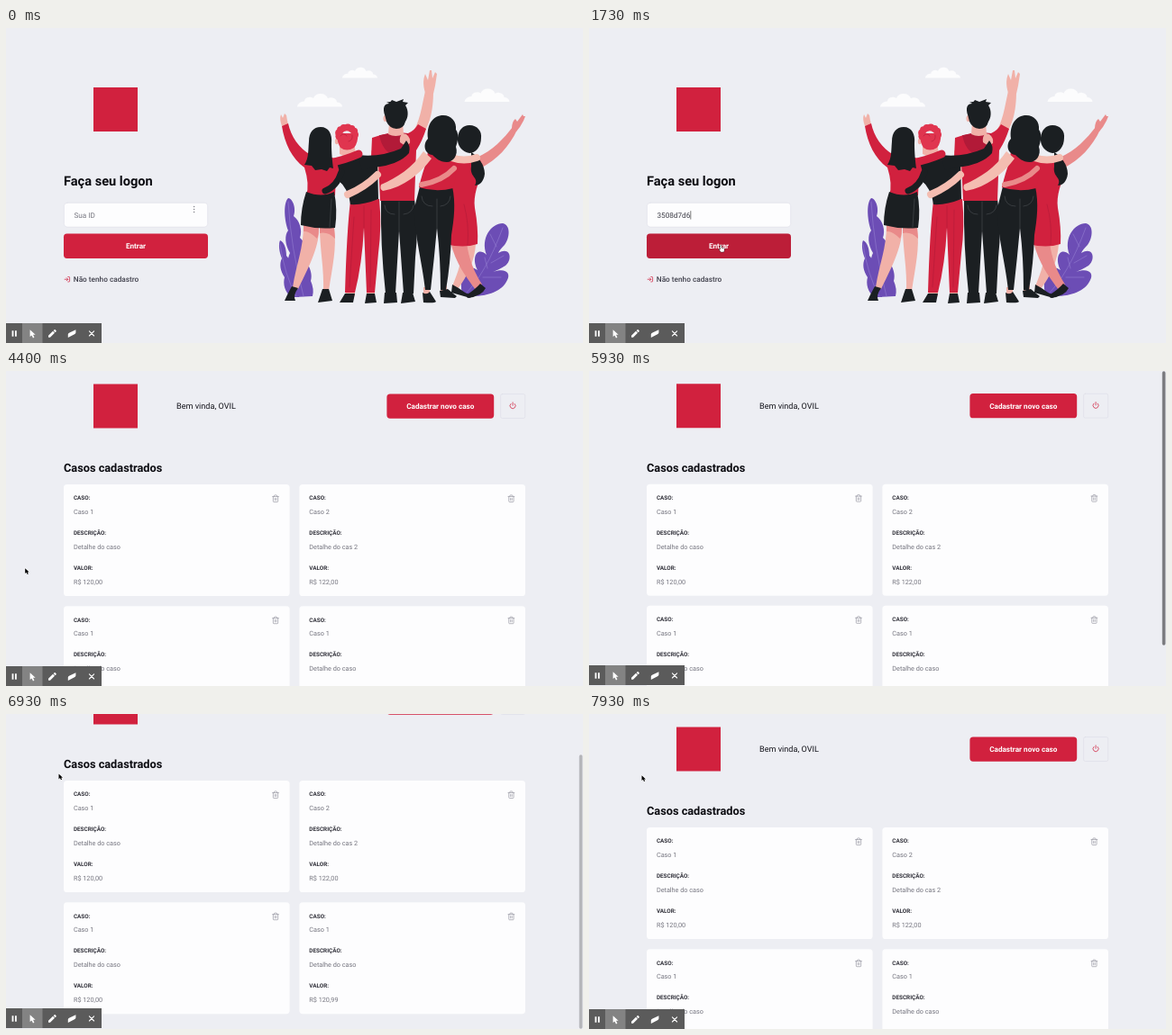
An HTML page with a canvas that plays this animation: 640 px wide and 350 px high, repeating every 8 s.

```html
<!DOCTYPE html>
<html lang="pt-BR">
<head>
<meta charset="utf-8">
<title>Logon e casos</title>
<style>
html, body { margin: 0; width: 100%; height: 100%; overflow: hidden; background: #edeef3; }
canvas { display: block; width: 640px; height: 350px; }
</style>
</head>
<body>
<canvas id="stage" width="640" height="350"></canvas>
<script>
const ctx = document.getElementById('stage').getContext('2d');
const LOOP = 8000;
const BG = '#edeef3', RED = '#d1213e', DARK = '#b21a38', BLACK = '#1b1f22';
const SKIN = '#f1b1a8', PALE = '#f4bdb1', ROSE = '#e98a8a', PURPLE = '#6c4db5', RIB = '#8f77cd';
const LABEL = '#2f2f38', GREY = '#75757f';

const clamp = v => Math.max(0, Math.min(1, v));
const span = (t, a, b) => clamp((t - a) / (b - a));
const easeOut = p => 1 - (1 - p) ** 3;
const easeInOut = p => p * p * (3 - 2 * p);

function fill(color, d) {
  ctx.fillStyle = color;
  ctx.fill(new Path2D(d));
}

function line(color, width, d) {
  ctx.strokeStyle = color;
  ctx.lineWidth = width;
  ctx.lineCap = ctx.lineJoin = 'round';
  ctx.stroke(new Path2D(d));
}

function oval(color, x, y, rx, ry = rx) {
  ctx.fillStyle = color;
  ctx.beginPath();
  ctx.ellipse(x, y, rx, ry, 0, 0, Math.PI * 2);
  ctx.fill();
}

function box(x, y, w, h, r, color, border) {
  ctx.beginPath();
  ctx.roundRect(x, y, w, h, r);
  if (color) { ctx.fillStyle = color; ctx.fill(); }
  if (border) { ctx.strokeStyle = border; ctx.lineWidth = 0.6; ctx.stroke(); }
}

// y is the middle of the capital letters
function text(s, x, y, size, color, weight = 400, align = 'left') {
  ctx.font = `${weight} ${size}px Roboto, sans-serif`;
  ctx.textAlign = align;
  ctx.fillStyle = color;
  ctx.fillText(s, x, y + size * 0.356);
}

function at(x, y, scale, draw) {
  ctx.save();
  ctx.translate(x, y);
  ctx.scale(scale, scale);
  draw();
  ctx.restore();
}

function cloud(x, y, w, h) {
  at(x, y, 1, () => {
    ctx.scale(w, h);
    fill('#fcfcfd', 'M0 0A.15 .4 0 0 1 .16 -.38A.12 .3 0 0 1 .36 -.62A.17 .5 0 0 1 .68 -.6A.13 .35 0 0 1 .88 -.32A.12 .32 0 0 1 1 0Z');
  });
}

function plants() {
  fill(PURPLE, 'M313 189C319 190 322 202 319 209C326 214 329 225 326 233C333 239 334 250 331 258C338 265 340 275 338 281Q342 290 340 298L320 299C315 290 314 282 317 276C311 266 312 256 315 250C309 240 309 230 313 225C309 215 307 195 313 189Z');
  fill(PURPLE, 'M304 236C309 238 311 246 311 253C316 258 317 266 317 271C324 278 327 290 325 299L317 299C309 294 307 284 309 277C304 270 303 262 306 256C303 249 302 240 304 236Z');
  line(RIB, 0.7, 'M313 193Q316 245 330 298M304 240Q309 275 322 298');
  fill(PURPLE, 'M507 297C503 288 505 276 510 270Q515 263 523 269C516 256 522 242 533 252C526 234 538 217 551 217C560 219 559 233 553 241Q547 247 546 250C560 242 562 258 554 264Q546 269 540 271C555 266 560 273 556 280C549 296 525 300 507 297Z');
  line(RIB, 0.7, 'M508 297Q532 274 551 222M534 267L531 255M538 261L552 253M524 281L517 272M529 277L549 277M544 243L537 229');
}

function womanInDress() {
  fill(SKIN, 'M506 240L521 240C520 258 512 276 501 290L495 287C502 270 506 258 506 240Z');
  fill(ROSE, 'M493 238L511 238C513 257 520 272 528 285L521 291C510 276 499 262 493 238Z');
  fill(BLACK, 'M510 297Q520 291 526 284L532 289Q528 298 512 300Z');
  fill(BLACK, 'M495 285L502 289Q508 294 516 297L515 300L494 294Z');
  fill(ROSE, 'M522 144C540 136 552 123 562 110L567 113C558 132 545 146 526 156Z');
  fill(ROSE, 'M561 112Q561 104 565 101L567 104L573 96L574 98L576 98L574 103L570 110L566 115Z');
  fill(RED, 'M494 150Q508 142 526 147L529 156C524 173 518 185 520 200Q524 222 523 240Q507 245 488 240L490 190Z');
  line(DARK, 0.6, 'M508 196Q514 218 512 241');
  fill(BLACK, 'M514 108C523 108 528 115 527 122C527 132 521 139 514 139C506 138 500 130 501 122C502 113 507 108 514 108Z');
  fill(BLACK, 'M516 138C524 143 531 152 531 162C530 171 525 175 520 175C525 166 514 166 516 154Z');
}

function womanInTop() {
  fill(SKIN, 'M463 288h7v9h-7zM482 286h7v8h-7z');
  fill(BLACK, 'M459 176Q476 182 495 176C499 195 497 212 494 230Q493 262 488 291L482 291Q482 255 478 222Q475 255 471 291L465 291C462 262 452 225 453 200Z');
  fill(BLACK, 'M462 294Q467 297 470 293L477 304Q476 306 463 305ZM481 292L490 290Q497 296 500 298L498 300L482 299Z');
  line('#54585d', 0.5, 'M478 190V222M461 187Q462 198 473 198M482 198Q492 197 493 187');
  fill(RED, 'M468 137Q484 130 498 142Q501 160 496 178Q477 183 458 177Q462 160 466 150Z');
  line(ROSE, 6, 'M497 156Q484 170 461 174');
  line(PALE, 8, 'M494 144Q508 149 522 144');
}

function man() {
  fill(BLACK, 'M416 190L453 190Q458 220 454 255L452 295L441 295L436 225L432 295L421 295Q415 240 416 190Z');
  fill(BLACK, 'M420 294L433 294L434 305L419 306ZM440 294L451 294L454 304L438 306Z');
  line('#54585d', 0.5, 'M436 193V225M420 197Q421 207 431 207M441 207Q451 206 452 197');
  fill(SKIN, 'M450 118C459 105 461 88 465 70L474 70C474 92 470 112 456 126Z');
  fill(SKIN, 'M465 72C462 62 463 56 465 51L468 58L470 47L472 47L473 56L476 49L478 51L476 64L474 73Z');
  fill(SKIN, 'M405 136L412 140L414 166L406 166Z');
  fill(RED, 'M406 122Q428 114 446 117Q453 114 457 107L466 112Q462 125 455 136L453 192L415 192L413 150L405 144Z');
  fill(DARK, 'M415 119Q430 115 446 118Q444 138 432 141Q418 139 414 119Z');
  fill(SKIN, 'M425 105H440L441 118Q432 122 424 118Z');
  oval(SKIN, 420.8, 100.5, 2.3, 3.5);
  fill(BLACK, 'M420.5 98C417 88 420 84 425 84L422 82Q427 83 428 80L433 82L441 79L440 82L446 83L443 86C447 92 446 100 443 104Q441 112 433 112Q425 111 422 104Z');
}

function womanInBlack() {
  fill(SKIN, 'M377 291h10v7h-10zM400 291h9v7h-9z');
  fill(RED, 'M382 192L414 190Q417 220 413 250L409 294L400 294L397 222Q395 262 387 294L376 294Q378 225 382 192Z');
  line(DARK, 0.6, 'M397 198V222M405 202L404 288M386 210L381 288');
  fill(BLACK, 'M376 295L387 295L385 305L370 305ZM400 295L409 295L411 305L398 306Z');
  fill(BLACK, 'M366 153Q378 140 398 142L412 150L413 190Q396 197 382 196Q380 178 367 168Z');
  fill(SKIN, 'M437 127Q436 120 440 117L444 118Q449 122 448 128L443 131Z');
  fill(BLACK, 'M390 141Q415 144 438 134L444 125Q449 131 447 139Q436 152 408 155L395 158Z');
  fill(SKIN, 'M370 126H386L388 141Q378 146 370 140Z');
  oval(SKIN, 367, 126, 2.2, 3.2);
  for (let i = 0; i < 9; i++) {
    const a = Math.PI * (0.9 + i * 0.16);
    oval('#e0354f', 378 + 9 * Math.cos(a), 118 + 7.5 * Math.sin(a), 4);
  }
  fill('#e0354f', 'M367 117L390 117Q391 127 386 133Q378 138 371 133Q367 127 367 117Z');
  line(DARK, 0.6, 'M371 120Q374 115 378 120M380 126Q385 125 384 119');
  line(PALE, 8, 'M412 163Q398 177 379 185');
}

function womanInSkirt() {
  fill(SKIN, 'M330 219L347 222C348 240 338 262 324 290L318 288C322 262 330 245 330 219Z');
  fill(SKIN, 'M348 222L364 222C367 245 362 265 358 292L352 292C353 268 348 245 348 222Z');
  fill(ROSE, 'M330 219L347 222Q347 230 345 234Q336 225 330 226ZM348 222H364L365 234Q357 226 348 228Z');
  fill(BLACK, 'M317 287L324 289Q318 297 321 303L309 303Q312 296 317 287ZM351 290L358 290L362 303L346 305Z');
  fill(SKIN, 'M306 109Q303 101 305 96L307 100L309 95L311 97L312 103L313 107Z');
  line(RED, 9, 'M358 150Q375 147 391 140');
  fill(RED, 'M306 109L313 106C316 120 325 134 338 141Q350 138 366 146L370 160Q365 172 365 186Q346 190 333 186Q337 174 331 155C317 145 309 128 306 109Z');
  line(BLACK, 7, 'M372 160Q367 176 354 181');
  fill(BLACK, 'M333 182Q350 189 364 182Q368 202 365 222Q346 224 327 219Q327 200 333 182Z');
  line('#54585d', 0.5, 'M361 190L359 221');
  fill(BLACK, 'M349 110C358 110 362 118 361 128C361 140 362 148 363 156L359 155L356 159L350 157L343 158L339 153L331 152C336 144 335 136 336 126C336 116 341 110 349 110Z');
}

function crowd() {
  cloud(373, 55.5, 39, 12.5);
  cloud(323, 87.5, 50, 15.5);
  cloud(508.5, 82, 50, 15.5);
  plants();
  womanInDress();
  man();
  womanInTop();
  fill(PALE, 'M463 137L472 145C460 161 442 177 418 181Q414 179 416 174C434 166 450 156 463 137Z');
  fill(BLACK, 'M485 97C494 97 500 104 499 113C503 118 501 126 499 132C502 141 496 149 489 149C481 149 476 144 473 141C464 140 462 129 468 123C466 107 474 97 485 97Z');
  womanInBlack();
  womanInSkirt();
}

function logo(y) {
  box(97, y - 24.5, 49, 49, 0, RED);
}

function arrow(x, y) {
  at(x, y, 0.62, () => {
    const d = 'M0 0V9.5L2.3 7.4L4 11L5.8 10.2L4.2 6.8H7.2Z';
    line('#fff', 1.4, d);
    fill('#000', d);
  });
}

function hand(x, y) {
  at(x, y, 0.54, () => {
    const d = 'M-2 -6Q-.8 -7 0 -6V-1L5 0Q6.5 1 5.5 4L4.5 7H-1.5L-5 1.5Q-4.5 0 -2 2Z';
    line('#222', 1.6, d);
    fill('#fff', d);
  });
}

function beam(x, y) {
  for (const dy of [-3, 0, 3]) oval('#85858c', x, y + dy, 0.8);
}

function login(t) {
  const typed = '3508d7d6'.slice(0, Math.max(0, Math.floor((t - 530) / 104) + 1));
  logo(90.5);
  text('Faça seu logon', 64, 170.2, 14.6, '#0b0b10', 700);

  box(64.3, 194.2, 159.4, 26.9, 3.6, '#fdfdfe', '#dcdce6');
  text(typed || 'Sua ID', 75.5, 208, 8.19, typed ? '#3c3c46' : '#777780');
  if (t > 130) {
    const w = typed ? ctx.measureText(typed).width : 0;
    ctx.fillStyle = '#222';
    ctx.fillRect(75.8 + w, 203.2, 0.6, 9.4);
  }

  const hover = span(t, 1530, 1730);
  box(64, 228.6, 160, 27.3, 3.6, RED);
  box(64, 228.6, 160, 27.3, 3.6, `rgba(0,0,0,${0.1 * hover})`);
  text('Entrar', 144, 242.2, 8.19, '#fff', 700, 'center');

  at(64.2, 275.6, 0.303, () =>
    line(RED, 2.4, 'M15 3h4a2 2 0 0 1 2 2v14a2 2 0 0 1-2 2h-4M10 17l5-5-5-5M15 12H3'));
  text('Não tenho cadastro', 74.8, 279.3, 8.24, '#41414d', 500);
  crowd();

  if (t < 530) beam(208.6, 201.5);
  if (t >= 1400) {
    const p = easeInOut(span(t, 1400, 1700));
    const x = 208 - 61 * p, y = 203 + 42 * p;
    if (y < 221) beam(x, y);
    else if (y < 228.6) arrow(x, y);
    else hand(x, y);
  }
}

function trash(x, y) {
  at(x - 4.55, y - 4.55, 0.38, () =>
    line('#a0a0aa', 2, 'M3 6h18M19 6v14a2 2 0 0 1-2 2H7a2 2 0 0 1-2-2V6M8 6V4a2 2 0 0 1 2-2h4a2 2 0 0 1 2 2v2M10 11v6M14 11v6'));
}

function card(x, y, name, detail, value) {
  box(x, y, 250.6, 124, 3.6, '#fdfdfe');
  [['CASO:', name], ['DESCRIÇÃO:', detail], ['VALOR:', value]].forEach(([label, body], i) => {
    text(label, x + 10.9, y + 15.1 + i * 38.9, 6.37, LABEL, 700);
    text(body, x + 10.9, y + 30.6 + i * 38.9, 7.28, GREY);
  });
  trash(x + 235, y + 15.7);
}

function cases(t, scroll) {
  ctx.save();
  ctx.translate(0, -scroll);
  logo(39);
  text('Bem vinda, OVIL', 189, 39.2, 9.1, '#15151c');
  box(422.4, 25.4, 118.8, 27.3, 3.6, RED);
  text('Cadastrar novo caso', 481.8, 39.2, 8.19, '#fff', 700, 'center');
  box(548.6, 25.6, 27.1, 26.9, 1.8, null, '#dcdce6');
  at(558, 34.2, 0.34, () => line(RED, 2.2, 'M18.36 6.64a9 9 0 1 1-12.73 0M12 2v10'));
  text('Casos cadastrados', 64, 107.4, 12.74, '#0b0b10', 700);
  if (t >= 2200) {
    card(64, 126, 'Caso 1', 'Detalhe do caso', 'R$ 120,00');
    card(325.4, 126, 'Caso 2', 'Detalhe do cas 2', 'R$ 122,00');
    card(64, 261.2, 'Caso 1', 'Detalhe do caso', 'R$ 120,00');
    card(325.4, 261.2, 'Caso 1', 'Detalhe do caso', 'R$ 120,99');
  }
  ctx.restore();

  const shown = t < 5930 ? 0 : t < 7000 ? 1 - 0.85 * span(t, 6800, 7020) : 1 - span(t, 7730, 7930);
  if (shown > 0) {
    ctx.globalAlpha = shown;
    box(635.8, scroll * 350 / 402, 3.6, 304.5, 1.8, '#7c7c80');
    ctx.globalAlpha = 1;
  }
}

function toolbar(y) {
  at(0, y, 1, () => {
    box(0, 0, 106, 22, 0, '#5b5b5b');
    box(18, 0, 22.5, 22, 0, '#838383');
    fill('#fff', 'M6.6 8.3h1.8v6.4h-1.8zM10 8.3h1.8v6.4h-1.8z');
    fill('#fff', 'M26.6 7.3V15l1.9-1.6 1.5 3 1.4-.7-1.4-2.9h2.6z');
    fill('#fff', 'M47 15.8v-2l5-5 2 2-5 5zM52.6 8.2l1-1q.6-.4 1.1.1l.9.9q.5.5 0 1.1l-1 1z');
    fill('#fff', 'M68.8 12.2Q69 11 70.5 10.4L77.4 7.2V10.5Q77.2 11.7 76 12.3L68.8 16Z');
    line('#fff', 1.1, 'M92.4 8.8l5.2 5.2m0-5.2l-5.2 5.2');
  });
}

function scrollAt(t) {
  if (t < 7000) return 52 * easeOut(span(t, 5930, 6360));
  return 52 * (1 - easeInOut(span(t, 7000, 7460)));
}

function draw(t) {
  const scroll = scrollAt(t);
  ctx.fillStyle = BG;
  ctx.fillRect(0, 0, 640, 350);
  if (t < 2130) login(t);
  else cases(t, scroll);
  toolbar(scroll > 0 ? 327 : 328);
  if (t >= 4400 && t < 4730) arrow(21.2, 219.2);
  if (t >= 6800) arrow(58.5, t < 7000 ? 66.5 : 68.2);
}

ctx.textRendering = 'geometricPrecision';
const start = performance.now();
function frame() {
  draw((performance.now() - start) % LOOP);
  requestAnimationFrame(frame);
}
frame();
</script>
</body>
</html>
```
